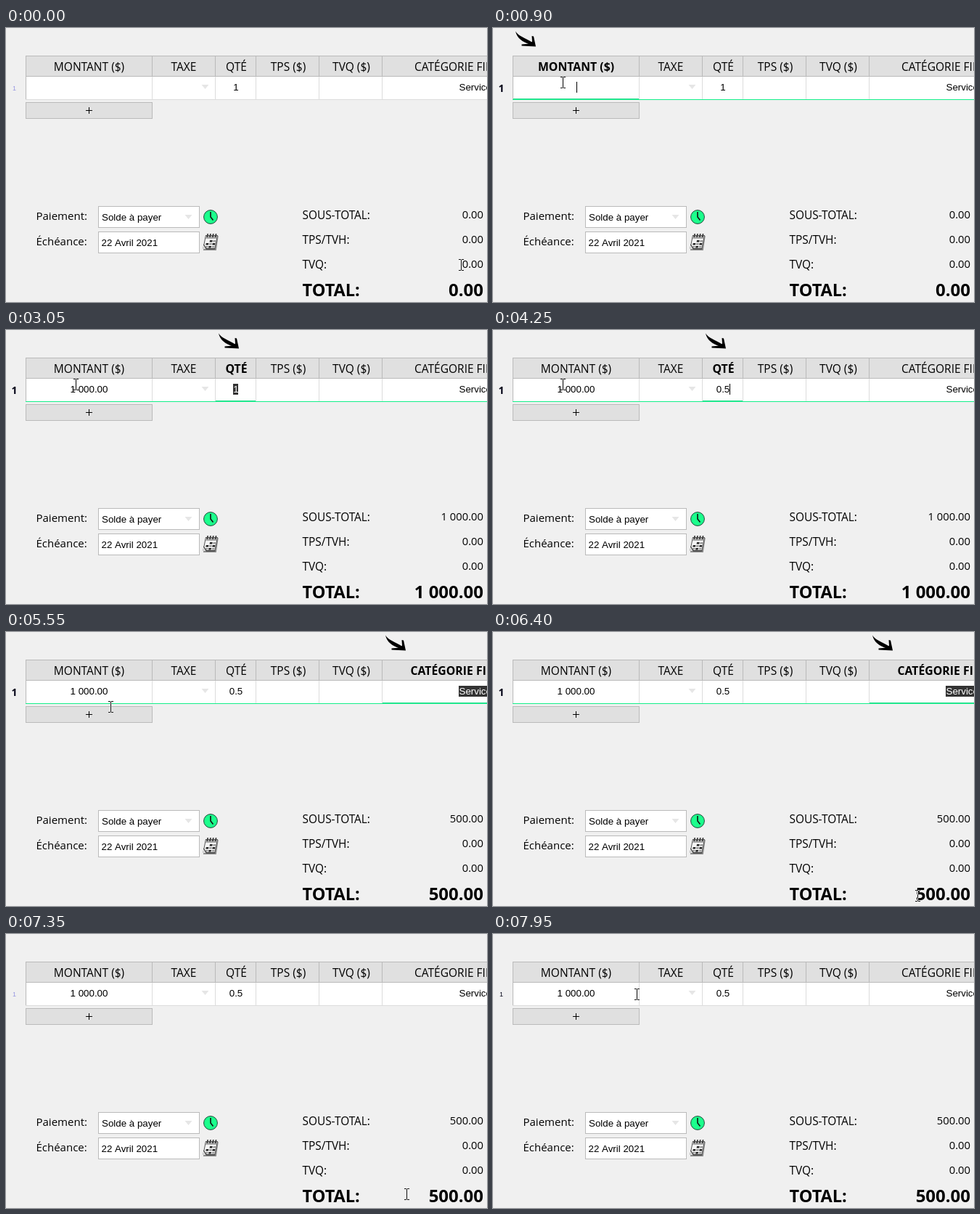
An HTML page with a canvas that plays this animation: 663x377 px, repeating every 8 s.

```html
<!DOCTYPE html>
<html lang="fr">
<head>
<meta charset="utf-8">
<title>Facture</title>
<style>
html, body { margin: 0; width: 100%; height: 100%; overflow: hidden; background: #f0f0f0; }
canvas { display: block; }
</style>
</head>
<body>
<canvas id="stage" width="663" height="377"></canvas>
<script>
const ctx = document.getElementById('stage').getContext('2d');
const LOOP = 8000, STEP = 50;
const UI = '"Open Sans", "Noto Sans", sans-serif';
const ARIAL = '"Liberation Sans", Arial, sans-serif';
const FIELD = `13.33px ${ARIAL}`;
const GREEN = '#14f08a', FOCUS_GREEN = '#2bdc8f', BORDER = '#bababa', DIVIDER = '#dcdcdc';

const columns = [
  { x: 27, end: 201, mid: 114.5, label: 'MONTANT ($)' },
  { x: 201, end: 288, mid: 245, label: 'TAXE' },
  { x: 288, end: 344, mid: 317.5, label: 'QTÉ' },
  { x: 344, end: 431, mid: 389, label: 'TPS ($)' },
  { x: 431, end: 518, mid: 476, label: 'TVQ ($)' },
  { x: 518, end: 700, mid: 643, label: 'CATÉGORIE FINANCIÈRE' }
];
const AMOUNT = 0, QUANTITY = 2, CATEGORY = 5, NONE = -1;

// Each track lists [start time, value]; values hold until the next entry.
const focusTrack = [[0, NONE], [650, AMOUNT], [3000, QUANTITY], [4800, CATEGORY], [6500, NONE]];
const amountTrack = [[0, ''], [1550, '1'], [1800, '10'], [1900, '100'], [2250, '1000'], [3000, '1 000.00']];
const quantityTrack = [[0, '1'], [3700, '0'], [4050, '0.'], [4250, '0.5']];
const totalTrack = [[0, '0.00'], [3050, '1 000.00'], [4800, '500.00']];
const caretTrack = [[0, false], [650, true], [1200, false], [1550, true], [2800, false], [3700, true], [4800, false]];
const arrowOffset = { [AMOUNT]: 0, [QUANTITY]: 262, [CATEGORY]: 492 };

// Pointer way points: time, x, y.
const pointerPath = [
  [0, 627, 326], [150, 585, 297], [400, 320, 160], [600, 135, 88], [850, 96, 76], [900, 96, 75],
  [5400, 96, 75], [5600, 160, 112], [5900, 430, 270], [6150, 612, 358], [6250, 611, 363],
  [6400, 585, 363], [6450, 585, 363], [6650, 653, 362], [7100, 653, 362], [7350, 552, 358],
  [7400, 548, 357], [7500, 548, 357], [7750, 370, 205], [7950, 198, 83], [8000, 198, 83]
];

const clamp = v => Math.max(0, Math.min(1, v));
const mix = (a, b, k) => a + (b - a) * k;

function valueAt(track, t) {
  let value = track[0][1];
  for (const [start, v] of track) if (t >= start) value = v;
  return value;
}

function pointerAt(t) {
  const i = pointerPath.findIndex(p => p[0] > t);
  const a = pointerPath[i - 1], b = pointerPath[i];
  const k = (t - a[0]) / (b[0] - a[0]);
  return { x: Math.round(mix(a[1], b[1], k)), y: Math.round(mix(a[2], b[2], k)) };
}

function rect(x, y, w, h, color) {
  ctx.fillStyle = color;
  ctx.fillRect(x, y, w, h);
}

function box(x, y, w, h, fill, border) {
  rect(x, y, w, h, border);
  rect(x + 1, y + 1, w - 2, h - 2, fill);
}

function text(str, x, y, font, align = 'left', color = '#000') {
  ctx.font = font;
  ctx.textAlign = align;
  ctx.fillStyle = color;
  ctx.fillText(str, x, y);
}

function shape(points, color) {
  ctx.fillStyle = color;
  ctx.beginPath();
  points.forEach(([x, y]) => ctx.lineTo(x, y));
  ctx.fill();
}

function line(points, color, width) {
  ctx.strokeStyle = color;
  ctx.lineWidth = width;
  ctx.beginPath();
  points.forEach(([x, y]) => ctx.lineTo(x, y));
  ctx.stroke();
}

function dropMark(x, y) {
  shape([[x - 5, y], [x + 5, y], [x, y + 6]], '#e6e6e6');
}

function drawArrow(dx) {
  ctx.save();
  ctx.translate(dx, 0);
  ctx.fillStyle = '#000';
  ctx.fill(new Path2D('M31 4.5C35 11 43 13 54.5 20L52 23C40 19 33 14 31 4.5Z'));
  ctx.fill(new Path2D('M53.5 11L56 11.5L59 25.5L39.5 24.5L39.5 22.5L52 21.5L54 18.5Z'));
  ctx.restore();
}

function drawHeader(focus) {
  rect(27, 38, 636, 29, BORDER);
  columns.forEach((c, i) => {
    rect(c.x + 1, 39, c.end - c.x - 1, 27, '#e0e0e0');
    const font = i === focus ? `bold 15.8px ${UI}` : `15.5px ${UI}`;
    if (i === CATEGORY) text(c.label, i === focus ? 557.5 : 563, 59, font);
    else text(c.label, c.mid, 59, font, 'center');
  });
}

function drawField(column, str, selected, caret) {
  const mid = column.mid - (column === columns[QUANTITY] ? 0.5 : 0);
  ctx.font = FIELD;
  const half = ctx.measureText(str).width / 2;
  if (selected) rect(Math.round(mid - half), 74, Math.round(half * 2), 15, '#333');
  text(str, mid, 86, FIELD, 'center', selected ? '#fff' : '#000');
  if (caret) rect(Math.floor(mid + half + 0.5), 74, 1, 15, '#000');
}

function drawRow(t, focus) {
  const active = focus !== NONE;
  rect(27, 67, 636, 32, '#fff');
  rect(27, 98, 636, 1, active ? GREEN : DIVIDER);
  columns.forEach((c, i) => rect(c.x, 67, 1, 31, i ? DIVIDER : BORDER));
  if (active) {
    const c = columns[focus];
    rect(c.x + 1, 97, c.end - c.x - 1, 1, FOCUS_GREEN);
  }
  dropMark(274.5, 78);

  const caret = valueAt(caretTrack, t);
  drawField(columns[AMOUNT], valueAt(amountTrack, t), false, caret && focus === AMOUNT);
  drawField(columns[QUANTITY], valueAt(quantityTrack, t),
    focus === QUANTITY && t < 3700, caret && focus === QUANTITY);
  const chosen = focus === CATEGORY;
  if (chosen) rect(624, 74, 39, 15, '#333');
  text('Services', 624.5, 86, FIELD, 'left', chosen ? '#fff' : '#000');
}

function drawRowNumber(t, pointer) {
  const grow = clamp((t - 600) / 200) * (1 - clamp((t - 6450) / 200));
  const hover = pointer.y > 67 && pointer.y < 98;
  const dark = hover ? 1 : grow;
  const color = `rgb(${mix(150, 0, dark)},${mix(150, 0, dark)},${mix(225, 20, dark)})`;
  const font = grow > 0.5 ? `bold ${mix(8, 14, grow)}px ${UI}` : `${mix(9, 14, grow)}px ${ARIAL}`;
  text('1', 11.5, mix(86, 88, grow), font, 'center', color);
}

function drawClock() {
  ctx.beginPath();
  ctx.arc(282, 260, 9.4, 0, Math.PI * 2);
  ctx.fillStyle = '#1cff8c';
  ctx.fill();
  ctx.strokeStyle = '#24443a';
  ctx.lineWidth = 1;
  ctx.stroke();
  line([[282, 253], [282, 260], [285.5, 264.5]], '#111', 1.6);
}

function drawCalendar() {
  ctx.save();
  ctx.transform(1, 0, -0.2, 1, 275, 285);
  shape([[2, 3], [18, 1], [19, 21], [1, 21]], '#8c8c8c');
  box(0, 0, 17, 19, '#f4f4f4', '#555');
  rect(1, 1, 15, 4, '#aaa');
  for (let i = 0; i < 4; i++) rect(2 + i * 3.8, -2, 1.6, 5, '#333');
  for (let r = 0; r < 3; r++)
    for (let c = 0; c < 3; c++)
      if (r + c > 0) rect(3 + c * 4.5, 7 + r * 4, 3.6, 2.6, (r + c) % 2 ? '#222' : '#999');
  shape([[0, 13], [5, 19], [0, 19]], '#ddd');
  line([[0, 13], [5, 19], [17, 19]], '#333', 1);
  ctx.restore();
}

function drawForm() {
  box(27, 102, 175, 23, '#e0e0e0', BORDER);
  rect(110, 113, 9, 1, '#000');
  rect(114, 109, 1, 9, '#000');

  const label = `15px ${UI}`;
  text('Paiement:', 41.5, 264, label);
  text('Échéance:', 41.5, 299, label);
  box(127, 245, 140, 30, '#fff', BORDER);
  box(127, 280, 140, 30, '#fff', BORDER);
  text('Solde à payer', 132, 265, FIELD);
  text('22 Avril 2021', 131.5, 300, FIELD);
  dropMark(251.5, 257);
  drawClock();
  drawCalendar();
}

function drawTotals(total) {
  const label = `15.4px ${UI}`, value = `14.8px ${UI}`;
  [['SOUS-TOTAL:', total], ['TPS/TVH:', '0.00'], ['TVQ:', '0.00']].forEach(([name, sum], i) => {
    text(name, 408.5, 263 + i * 34, label);
    text(sum, 658, 262 + i * 34, value, 'right');
  });
  text('TOTAL:', 408.5, 369, `bold 23.5px ${UI}`);
  text(total, 658, 369, `bold 24px ${UI}`, 'right');
}

function drawPointer({ x, y }) {
  ctx.save();
  ctx.globalCompositeOperation = 'difference';
  rect(x, y - 7, 1, 14, '#fff');
  for (const row of [y - 8, y + 7]) {
    rect(x - 3, row, 3, 1, '#fff');
    rect(x + 1, row, 3, 1, '#fff');
  }
  ctx.restore();
}

function draw(t) {
  const focus = valueAt(focusTrack, t);
  const pointer = pointerAt(t);
  rect(0, 0, 663, 377, '#f0f0f0');
  if (focus !== NONE) drawArrow(arrowOffset[focus]);
  drawHeader(focus);
  drawRow(t, focus);
  drawRowNumber(t, pointer);
  drawForm();
  drawTotals(valueAt(totalTrack, t));
  drawPointer(pointer);
}

const start = performance.now();
function tick() {
  const t = (performance.now() - start) % LOOP;
  draw(Math.floor(t / STEP) * STEP);
  requestAnimationFrame(tick);
}
tick();
</script>
</body>
</html>
```
